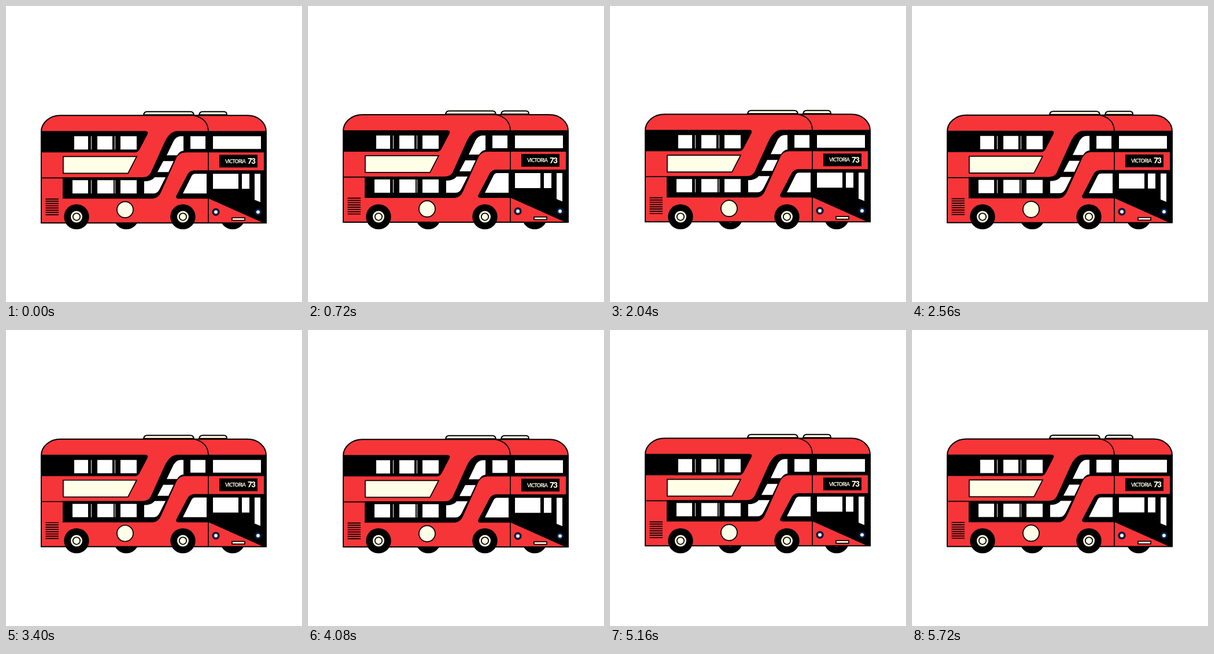
Recreate the animation shown at these times as an HTML page. Size 512 by 512 pixels, loop 5.76 s.

```html
<!DOCTYPE html>
<html lang="en">
<head>
<meta charset="utf-8">
<title>Double-decker bus</title>
<style>
  html, body { margin: 0; width: 100%; height: 100%; overflow: hidden; background: #fff; }
  svg { display: block; width: 100%; height: 100%; }
  .red { fill: #f63539; }
  .cream { fill: #fffee6; }
  .line { stroke: #000; stroke-width: 1.7; }
  .none { fill: none; }
  text { fill: #fffee6; font: 700 8.8px Lato, sans-serif; letter-spacing: -.75px; }
  .route { font-size: 13px; font-weight: 900; letter-spacing: -1.2px; }
</style>
</head>
<body>
<svg viewBox="0 0 512 512">
  <defs>
    <g id="wheel">
      <circle r="21.7"/>
      <circle class="cream" r="10"/>
      <circle class="cream" r="6.2" stroke="#000" stroke-width="1.8"/>
    </g>
    <g id="lamp">
      <circle r="6.6" fill="#07132f"/>
      <circle r="4.6" fill="#14306a"/>
      <circle class="cream" r="2.9"/>
    </g>
    <path id="glass" d="
      M118 225h24v23h-24z M158 225h26v23h-26z M198 225h28v23h-28z
      M147 225h1v23h-1z M188 225h1v23h-1z
      M115 301h27v23h-27z M158 301h28v23h-28z M198 301h28v23h-28z
      M147 301h1v23h-1z M188 301h1v23h-1z
      M307 225V250Q300 251 296 258H278L290 233Q295 225 302 225Z
      M272 268H290L281 287H262Z
      M239 303Q252 303 257 296H276L266 316Q262 324 256 324H239Z
      M319 225h26v22h-26z M358 225h83v22h-83z
      M327 290H347V324H306L321 294Q323 290 327 290Z
      M358 290h44v26h-44z M408 290h13v26h-13z
      M430 290h10v49l-10 -4z"/>
    <clipPath id="panes"><use href="#glass"/></clipPath>
  </defs>

  <use href="#wheel" x="208" y="364.6"/>
  <use href="#wheel" x="392" y="364.6"/>

  <g id="body">
    <path class="cream" stroke="#000" stroke-width="2"
      d="M238 188Q239 182.5 244 182.5H319Q324 182.5 325 188Z M334 188Q335 182.5 340 182.5H377Q382 182.5 382 188Z"/>
    <path class="red" stroke="#000" stroke-width="2"
      d="M61 375V217A33 28 0 0 1 94 189H418A32 28 0 0 1 450 217V375Z"/>

    <!-- decks, staircase and windscreen surrounds -->
    <path d="
      M61 216H240Q248 216 244 223L231 248Q228 253 223 253H61Z
      M98 296H236Q246 296 250 289L274 236Q283 216 297 216H450V375H445L351 333H300Q292 333 295 327L314 291Q318 284 326 284H446V253H311Q300 253 295 262L268 322Q263 333 253 333H98Z"/>
    <path class="line none" d="M61 297H98 M325 189Q349 194 350 216V375 M350 253V284"/>
    <use href="#glass" fill="#fff"/>
    <g clip-path="url(#panes)">
      <path id="glint" class="cream" d="M0 -24L512 -377V-330L0 23Z"/>
    </g>

    <path class="cream line" d="M99 260H226L211 289H99Z"/>
    <path id="vents" class="line"/>
    <circle class="cream line" cx="206" cy="352" r="14"/>

    <rect x="369" y="257" width="66" height="22"/>
    <text x="379" y="271.3">VICTORIA</text>
    <text class="route" x="418" y="272.6">73</text>

    <use href="#lamp" x="363" y="356"/>
    <use href="#lamp" x="436" y="356"/>
    <rect class="cream line" x="391" y="366" width="22" height="4.5"/>
  </g>

  <use href="#wheel" x="122" y="364.6"/>
  <use href="#wheel" x="306" y="364.6"/>
</svg>
<script>
  const LOOP = 5760, FRAME = 40, BOB = 314;
  const get = id => document.getElementById(id);
  const move = (id, y) => get(id).setAttribute('transform', `translate(0 ${y.toFixed(2)})`);

  get('vents').setAttribute('d',
    Array.from({ length: 8 }, (_, i) => `M68.5 ${333.5 + i * 3.9}h22.5`).join(''));

  function draw(now) {
    const t = Math.floor(now % LOOP / FRAME) * FRAME;
    const lift = (1 - Math.cos(2 * Math.PI * t / BOB)) / 2;
    move('body', .3 - 2.1 * lift);
    // a diagonal band of light crosses the windows once per loop
    move('glint', 561 + (t - 1480) * .58);
    requestAnimationFrame(draw);
  }
  requestAnimationFrame(draw);
</script>
</body>
</html>
```
